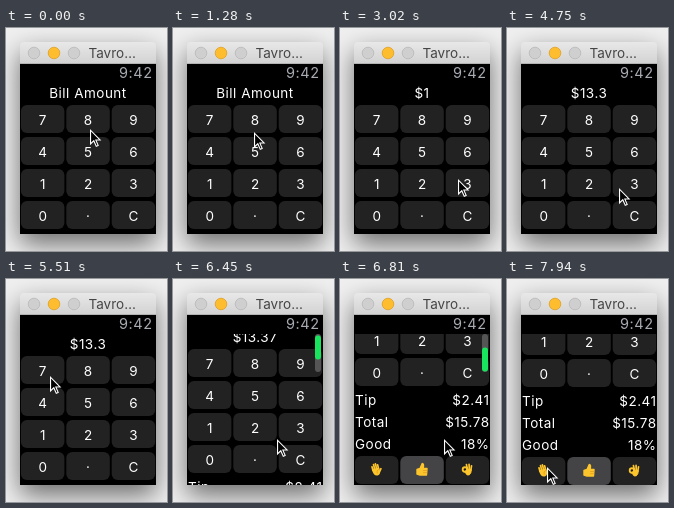
These frames come from a looping animation (161x223 px, 8 s). An HTML page:

```html
<!DOCTYPE html>
<html lang="en">
<head>
<meta charset="utf-8">
<title>Tip calculator</title>
<style>
html, body { margin: 0; width: 100%; height: 100%; overflow: hidden; background: #efefef; }
svg { display: block; width: 100%; height: 100%; }
text { font: 13.5px Inter, "Open Sans", sans-serif; letter-spacing: .5px; fill: #fff; }
.mid { text-anchor: middle; }
.end { text-anchor: end; }
.title { letter-spacing: 0; fill: #454545; }
.clock { font-size: 14.5px; fill: #a9abb3; }
</style>
</head>
<body>
<svg viewBox="0 0 161 223" xmlns="http://www.w3.org/2000/svg">
  <defs>
    <linearGradient id="bar" x2="0" y2="1">
      <stop stop-color="#e9e8e9"/><stop offset="1" stop-color="#d3d2d3"/>
    </linearGradient>
    <filter id="blur" x="-40%" y="-40%" width="180%" height="180%"><feGaussianBlur stdDeviation="13"/></filter>
    <clipPath id="view"><rect x="14" y="55" width="136" height="151"/></clipPath>
  </defs>

  <rect width="161" height="223" fill="#efefef"/>
  <rect x="14" y="24" width="136" height="192" rx="4" opacity=".55" filter="url(#blur)"/>
  <path d="M14 36V18q0-4 4-4H146q4 0 4 4V36Z" fill="url(#bar)"/>
  <path d="M14 35.5H150" stroke="#b4b3b4"/>
  <g stroke-width=".8">
    <circle cx="28" cy="25" r="5.8" fill="#d0cfd0" stroke="#b9b8b9"/>
    <circle cx="48" cy="25" r="5.8" fill="#fdbd2e" stroke="#dfa023"/>
    <circle cx="68" cy="25" r="5.8" fill="#d0cfd0" stroke="#b9b8b9"/>
  </g>
  <text class="title" x="82.5" y="30.3">Tavro…</text>

  <rect x="14" y="36" width="136" height="170"/>
  <text class="end clock" x="146.5" y="50.2">9:42</text>

  <g clip-path="url(#view)">
    <g id="page">
      <text id="bill" class="mid" x="82" y="69.5"></text>
      <g id="keys"></g>
      <g id="rows"></g>
      <g fill="none" stroke="#fdc52c" stroke-linecap="round" stroke-linejoin="round">
        <g transform="translate(36 284.5) rotate(-14)">
          <path d="M-3.2 0V-3.6M-1.2-1V-5.4M.8-1V-5.6M2.7 0V-4.2M2.6 3.4L5 .4" stroke-width="1.7"/>
          <path d="M-3.2-.5H2.7V3Q2.2 5.4 0 5.4Q-3.2 5-3.2-.5Z" fill="#fdc52c" stroke-width="1.5"/>
          <path d="M2.2 .6Q-.2 1.4 .2 3.8" stroke="#e09a1c" stroke-width=".8"/>
        </g>
        <g transform="translate(82 284.5)">
          <path d="M-5 0L-2-1L.2-6Q2.2-6 1.2-1H5L4.5 5.5H-2L-5 4.5Z" fill="#fdc52c" stroke-width="1.4"/>
          <path d="M1.5 1H5M1.5 3.2H4.8" stroke="#e09a1c" stroke-width=".7"/>
        </g>
        <g transform="translate(127 284.5) scale(.9)">
          <path d="M.5 0L-.6-5.4M2.5 0L2.3-5.6M4.2 1L5-4" stroke-width="1.9"/>
          <circle cx="-2.3" cy="0" r="2.5" stroke-width="2"/>
          <path d="M0 0H4.8Q5 4 2.5 6H0L-2 3.2Z" fill="#fdc52c" stroke-width="1"/>
        </g>
      </g>
    </g>
  </g>

  <rect id="track" x="142" y="55" width="6" height="38" rx="3" fill="#555"/>
  <rect id="thumb" x="142" width="6" height="24" rx="3" fill="#18e55d"/>

  <g id="cursor">
    <path d="M0 0V16.2L3.6 12.8L6 18L8.9 16.7L6.6 11.6H11.4Z" fill="#fff"/>
    <path d="M1.1 2.6V13.5L4 10.8L6.5 16.6L7.5 16.2L5 10.5H8.9Z"/>
  </g>
</svg>
<script>
const LOOP = 8000;
const $ = id => document.getElementById(id);

const bills = [[0, "Bill Amount"], [2350, "$1"], [3170, "$13"], [3910, "$13."], [4580, "$13.3"], [5660, "$13.37"]];

// start, end, steps, x, y, optional bend point
const moves = [
  [1170, 1900, 27, 41, 146],
  [2520, 3020, 18, 118, 151],
  [3200, 3770, 12, 73, 185],
  [3940, 4410, 11, 115, 160, 44, 185],
  [4750, 4750, 1, 112, 160],
  [4780, 5270, 19, 45, 98],
  [5510, 5510, 1, 44, 97],
  [5950, 6040, 4, 104, 160],
  [7610, 7940, 13, 40, 188]
];

const scrolls = [[6450, 7], [6540, 42], [6630, 73], [6720, 90], [6810, 94], [6920, 93]];

const key = (x, y, fill = "#222223") =>
  `<rect x="${x}" y="${y}" width="43.5" height="28" rx="6" fill="${fill}"/>`;
const keyX = col => 14.9 + col * 45.4;

$("keys").innerHTML = [..."7894561230·C"].map((c, i) => {
  const x = keyX(i % 3), y = 77 + 32 * Math.floor(i / 3);
  return key(x, y) + `<text class="mid" x="${x + 22}" y="${y + 19.6}">${c}</text>`;
}).join("");

$("rows").innerHTML = [["Tip", "$2.41"], ["Total", "$15.78"], ["Good", "18%"]].map(([name, value], i) => {
  const y = 219.5 + 22.2 * i;
  return `<text x="15" y="${y}">${name}</text><text class="end" x="149.5" y="${y}">${value}</text>`;
}).join("") + [0, 1, 2].map(i => key(keyX(i), 271, i === 1 ? "#444446" : undefined)).join("");

// Fraction reached after the latest of n even steps from a to b
function stepped(t, a, b, n) {
  if (t < a) return 0;
  if (t >= b) return 1;
  return (Math.floor((t - a) / (b - a) * (n - 1)) + 1) / n;
}

const ease = u => u * u * (3 - 2 * u);

function cursorAt(t) {
  let x = 84, y = 101;
  for (const [a, b, n, x1, y1, bx = (x + x1) / 2, by = (y + y1) / 2] of moves) {
    if (t < a) break;
    const u = ease(stepped(t, a, b, n)), v = 1 - u;
    x = v * v * x + 2 * u * v * bx + u * u * x1;
    y = v * v * y + 2 * u * v * by + u * u * y1;
  }
  return [x, y];
}

function scrollAt(t) {
  if (t < 6450) return 0;
  const s = Math.min(6920, 6450 + Math.floor((t - 6450) / 30) * 30);
  for (let i = 1; i < scrolls.length; i++) {
    const [a, p] = scrolls[i - 1], [b, q] = scrolls[i];
    if (s <= b) return p + (q - p) * (s - a) / (b - a);
  }
}

function draw(t) {
  $("bill").textContent = bills.filter(b => b[0] <= t).pop()[1];
  const [x, y] = cursorAt(t);
  $("cursor").setAttribute("transform", `translate(${Math.round(x)} ${Math.round(y)})`);
  const offset = scrollAt(t);
  $("page").setAttribute("transform", `translate(0 ${-offset})`);
  $("thumb").setAttribute("y", 55.5 + 13 * Math.min(1, offset / 93));
  $("thumb").setAttribute("opacity", t < 6450 ? 0 : 1 - stepped(t, 7240, 7400, 7));
  $("track").setAttribute("opacity", t < 6450 ? 0 : 1 - stepped(t, 6840, 6920, 3));
}

const start = performance.now();
function tick() {
  draw((performance.now() - start) % LOOP);
  requestAnimationFrame(tick);
}
tick();
</script>
</body>
</html>
```
